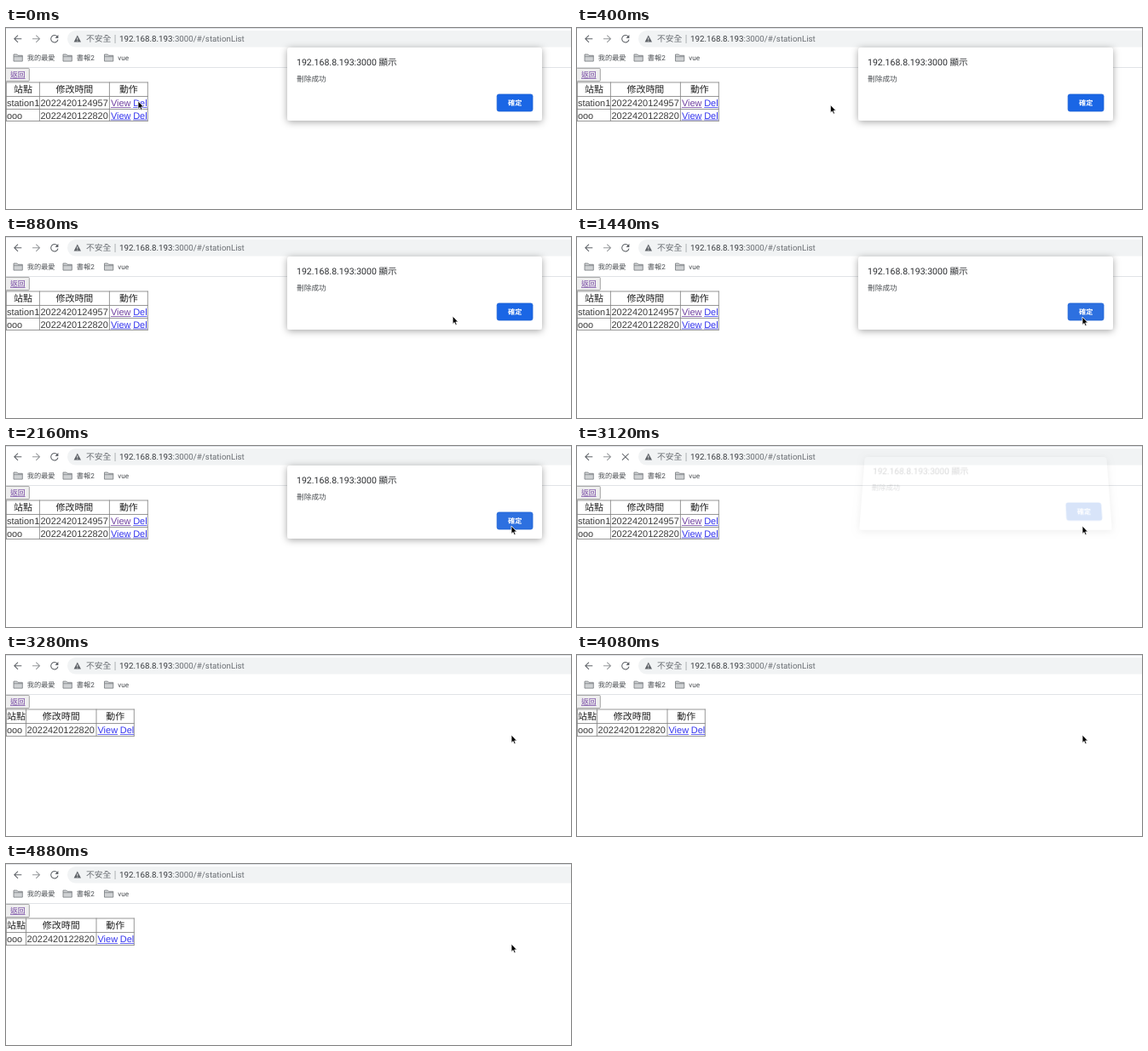
Animation, 663 px wide and 213 px high, one loop 4960 ms. Source, as an HTML page:

```html
<!DOCTYPE html>
<html lang="zh-Hant">
<head>
<meta charset="utf-8">
<title>Station list</title>
<style>
html, body { margin: 0; width: 100%; height: 100%; overflow: hidden; background: #fff; }
#stage { position: relative; width: 663px; height: 213px; overflow: hidden; }
svg { position: absolute; left: 0; top: 0; display: block; }
text { font-family: "Liberation Sans", "Noto Sans CJK TC", "Noto Sans CJK", sans-serif; white-space: pre; text-rendering: geometricPrecision; }
.ui text { font-family: Roboto, "Noto Sans CJK TC", "Noto Sans CJK", sans-serif; }
#dialog { transform-origin: 479.5px 66px; }
</style>
</head>
<body>
<div id="stage">
  <svg width="663" height="213" viewBox="0 0 663 213">
    <g class="ui">
      <rect width="663" height="1" fill="#dee1e6"/>
      <rect x="72" y="3" width="620" height="19.5" rx="9.75" fill="#f1f3f4"/>
      <rect y="46" width="663" height="1" fill="#e1e3e6"/>
      <g fill="none" stroke-width="1.05">
        <path d="M18.3 12.7H10M14 8.6L9.8 12.7L14 16.8" stroke="#5f6368"/>
        <path d="M31 12.7H39.3M35.3 8.6L39.5 12.7L35.3 16.8" stroke="#95989b"/>
        <path id="stop" d="M53 9L60.6 16.6M60.6 9L53 16.6" stroke="#5f6368"/>
        <g id="reload">
          <path d="M60 9.9A4.2 4.2 0 1 0 61 13.7" stroke="#5f6368"/>
          <path d="M61.4 8V11.9H57.5Z" fill="#5f6368"/>
        </g>
      </g>
      <path d="M83.8 8.6L88 16.6H79.6Z" fill="#5f6368"/>
      <path d="M83.8 11.3V13.8M83.8 14.6V15.6" stroke="#f1f3f4"/>
      <text x="94" y="16.2" font-size="9.8" fill="#6a6e73">不安全</text>
      <rect x="127.6" y="8" width=".9" height="10" fill="#a5a8ac"/>
      <text x="133" y="16.2" font-size="9.75" fill="#6a6e73"><tspan fill="#3a3d41">192.168.8.193</tspan>:3000/#/stationList</text>
      <g id="bookmarks" fill="#4a4e52" font-size="8.2"></g>
    </g>
    <rect x="-.5" y="47.4" width="27.8" height="15.2" rx="1" fill="#efefef" stroke="#999" stroke-width=".9"/>
    <text x="5" y="58.2" font-size="8.8" fill="#6f3f9f">返回</text>
    <rect x="5" y="59.3" width="17.5" height=".7" fill="#6f3f9f"/>
    <g id="table" font-size="10.98"></g>
  </svg>
  <svg id="dialog" class="ui" width="663" height="213" viewBox="0 0 663 213">
    <defs>
      <filter id="shade" x="-10%" y="-20%" width="120%" height="150%">
        <feDropShadow dx="0" dy="1.5" stdDeviation="4" flood-color="#000" flood-opacity=".36"/>
      </filter>
    </defs>
    <rect x="330" y="23" width="299" height="86" rx="3.5" fill="#fff" filter="url(#shade)"/>
    <text x="341" y="44.2" font-size="10.55" fill="#2b2d30">192.168.8.193:3000 顯示</text>
    <text x="341" y="63.4" font-size="8.7" fill="#4a4e52">刪除成功</text>
    <rect id="ok" x="576.2" y="78" width="41.8" height="20" rx="2.2" stroke="#1a60d4" stroke-width=".8"/>
    <text x="597.2" y="91" font-size="8.2" font-weight="700" text-anchor="middle" fill="#fff">確定</text>
  </svg>
  <svg width="663" height="213" viewBox="0 0 663 213">
    <path id="cursor" d="M0 0V9.4L2.1 7.5L3.5 10.7L5.1 10L3.7 6.9H6.5Z" fill="#000" stroke="#fff" stroke-width=".8"/>
  </svg>
</div>
<script>
const LOOP = 4960;
const CLOSE = 3000, CLOSED = 3160, RELOAD = 3200, LOADED = 3280;
const BLUE = '#3434ee', VISITED = '#6f3f9f', INK = '#3c3c3c';
const $ = id => document.getElementById(id);
const clamp = v => Math.max(0, Math.min(1, v));
const smooth = v => v * v * (3 - 2 * v);

// time, x, y
const path = [
  [0, 155, 86], [200, 155, 86], [560, 410, 94], [880, 524, 93],
  [1100, 556, 95], [1360, 593, 94], [LOOP, 593, 94]
];
const label = (x, y, s, more = '') => `<text x="${x}" y="${y}" ${more}>${s}</text>`;

function link(x, y, s, w, color) {
  return label(x, y, s, `fill="${color}"`) +
    `<rect x="${x}" y="${y + 1}" width="${w}" height=".75" fill="${color}"/>`;
}

function folder(x, s) {
  return `<path d="M${x} 31h3.8l1.2 1.3h5.3v6.8h-10.3z" fill="#d0d2d4" stroke="#75797d" stroke-width=".8"/>` +
    `<path d="M${x} 33.7h10.3" stroke="#75797d" stroke-width=".7"/>` + label(x + 15.8, 38, s);
}

function table(cols, rows) {
  const ys = [64, 80.5, 95.5, 109.5].slice(0, rows.length + 2);
  const end = ys[ys.length - 1];
  let d = '';
  for (const x of cols) d += `M${x} 63.6V${end + .4}`;
  for (const y of ys) d += `M0 ${y}H${cols[3] + .4}`;
  let out = `<path d="${d}" fill="none" stroke="#858585" stroke-width=".85"/>`;
  ['站點', '修改時間', '動作'].forEach((s, i) => {
    out += label((cols[i] + cols[i + 1]) / 2, 75.9, s, 'text-anchor="middle" fill="#222"');
  });
  rows.forEach(([name, date, color], i) => {
    const y = 92 + i * 14.6, x = cols[2] + 1.5;
    out += label(.9, y, name, `fill="${INK}"`) + label(cols[1] + 1.1, y, date, `fill="${INK}"`) +
      link(x, y, 'View', 23.7, color) + link(x + 26.3, y, 'Del', 16.4, BLUE);
  });
  return out;
}

const first = ['station1', '2022420124957', VISITED];
const second = ['ooo', '2022420122820', BLUE];
const tables = [
  table([.4, 39.4, 121.4, 166.3], [first, second]),
  table([.4, 23.5, 69, 93], []),
  table([.4, 23.5, 106, 150.3], [second])
];
$('bookmarks').innerHTML = folder(9, '我的最愛') + folder(67, '書報2') + folder(115.5, 'vue');

let shown = -1;
function draw(t) {
  const state = t < RELOAD ? 0 : t < LOADED ? 1 : 2;
  if (state !== shown) $('table').innerHTML = tables[shown = state];

  let i = 1;
  while (t > path[i][0]) i++;
  const [t0, x0, y0] = path[i - 1], [t1, x1, y1] = path[i];
  const k = (t - t0) / (t1 - t0);
  const x = x0 + (x1 - x0) * k, y = y0 + (y1 - y0) * k;
  $('cursor').setAttribute('transform', `translate(${x} ${y})`);
  $('ok').setAttribute('fill', x > 576 ? '#2d70e0' : '#1a66e5');

  const out = smooth(clamp((t - CLOSE) / (CLOSED - CLOSE)));
  const dialog = $('dialog').style;
  dialog.opacity = 1 - .95 * out;
  dialog.visibility = t < CLOSED ? 'visible' : 'hidden';
  dialog.transform = out
    ? `translateY(${-13 * out}px) perspective(160px) scaleX(${1 - .036 * out}) rotateX(${5.6 * out}deg)`
    : 'none';

  const loading = t >= 3040 && t < LOADED;
  $('stop').style.display = loading ? '' : 'none';
  $('reload').style.display = loading ? 'none' : '';
}

const start = performance.now();
function tick() {
  draw((performance.now() - start) % LOOP);
  requestAnimationFrame(tick);
}
draw(0);
requestAnimationFrame(tick);
</script>
</body>
</html>
```
